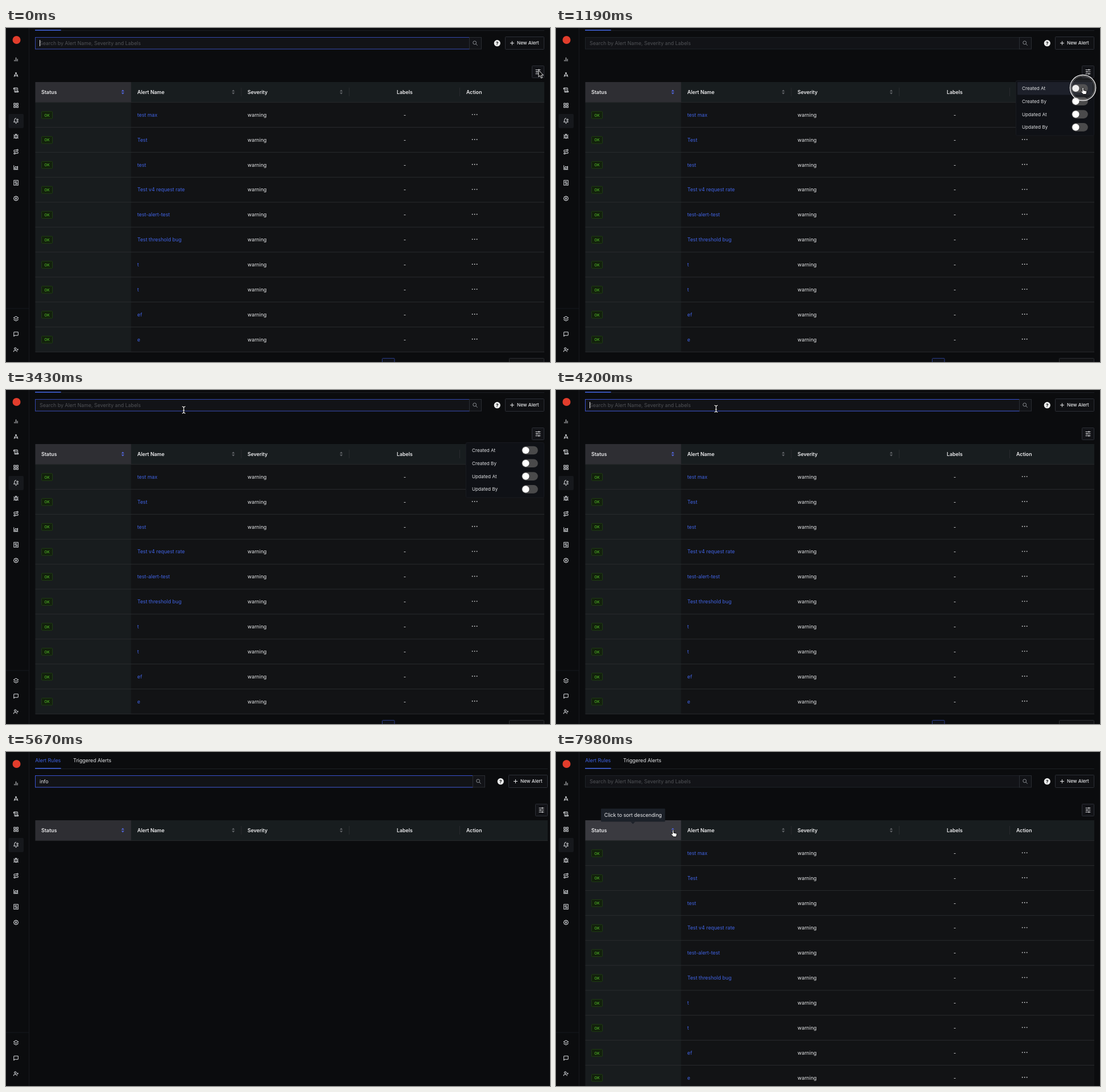
An HTML page for the animation above (8000 ms loop, 955 by 587 pixels).

```html
<!DOCTYPE html>
<html lang="en">
<head>
<meta charset="utf-8">
<title>Alert rules</title>
<style>
html, body { margin: 0; width: 100%; height: 100%; overflow: hidden; background: #0b0c0e; }
svg { display: block; font-family: Inter, "Open Sans", sans-serif; }
text { white-space: pre; }
</style>
</head>
<body>
<svg id="stage" width="955" height="587" viewBox="0 0 955 587" fill="none"></svg>
<script>
const LOOP = 8000, ROW = 43.86, TOP = 130.7;
const BLUE = '#4063e4', FOCUS = '#3a52d0', LINE = '#292b2e';

// Drawing helpers: every text is centred vertically on y.
const text = (x, y, s, fill = '#e6e7e9', size = 8.8, more = '') =>
  `<text x="${x}" y="${y + size * 0.364}" font-size="${size}" fill="${fill}" ${more}>${s}</text>`;
const rect = (x, y, w, h, fill, more = '') =>
  `<rect x="${x}" y="${y}" width="${w}" height="${h}" fill="${fill}" ${more}/>`;
const path = (d, stroke, more = '') => `<path d="${d}" stroke="${stroke}" ${more}/>`;
const circle = (x, y, r, fill, more = '') => `<circle cx="${x}" cy="${y}" r="${r}" fill="${fill}" ${more}/>`;
const bold = 'font-weight="600"', medium = 'font-weight="500"', middle = 'text-anchor="middle"';

const icons = [
  [55, 'M18 20V10M12 20V4M6 20v-6'],
  [82, 'M12 7a2 2 0 1 0 0-4 2 2 0 0 0 0 4M11 7 4 21M13 7l7 14M4 13c4 5 12 5 16 0'],
  [109, 'M8 21h12a2 2 0 0 0 2-2v-2H10v2a2 2 0 1 1-4 0V5a2 2 0 1 0-4 0v3h4M19 17V5a2 2 0 0 0-2-2H4M10 8h5M10 12h5'],
  [136, 'M3 3h7v7H3zM14 3h7v7h-7zM14 14h7v7h-7zM3 14h7v7H3z'],
  [163, 'M6 8a6 6 0 0 1 7-6M18 13c1 2 3 4 3 4H3s3-2 3-9M10 21a2 2 0 0 0 4 0M15 8a3 3 0 1 0 6 0a3 3 0 1 0-6 0'],
  [190.5, 'M8 2l2 2M16 2l-2 2M9 7V6a3 3 0 0 1 6 0v1M12 20a6 6 0 0 1-6-6v-3a4 4 0 0 1 4-4h4a4 4 0 0 1 4 4v3a6 6 0 0 1-6 6V11M6 13H2M22 13h-4M3 21c0-2 1-4 4-4M21 21c0-2-1-4-4-4M3 5c0 2 1 4 4 4M21 5c0 2-2 4-4 4'],
  [217.5, 'M9 19h8.5a3.5 3.5 0 0 0 0-7h-11a3.5 3.5 0 0 1 0-7H15M3 19a3 3 0 1 0 6 0a3 3 0 1 0-6 0M15 5a3 3 0 1 0 6 0a3 3 0 1 0-6 0'],
  [245, 'M3 3v18h18M7 17v-5l4-4 4 4 4-5v10z'],
  [272, 'M3 2h18v20H3zM8 7h8M8 12h8M8 17h8M8 7v5M16 12v5'],
  [299.5, 'M12 2l3 3 4 0 1 4 2 3-2 3-1 4-4 0-3 3-3-3-4 0-1-4-2-3 2-3 1-4 4 0zM9 12a3 3 0 1 0 6 0a3 3 0 1 0-6 0'],
  [511, 'M12 2 2 8l10 6 10-6zM2 15l10 6 10-6'],
  [538, 'M21 15a2 2 0 0 1-2 2H7l-4 4V5a2 2 0 0 1 2-2h14a2 2 0 0 1 2 2z'],
  [565.5, 'M2 21v-2a4 4 0 0 1 4-4h6a4 4 0 0 1 4 4v2M5 7a4 4 0 1 0 8 0a4 4 0 1 0-8 0M19 8v6M16 11h6']
];

function sidebar() {
  return rect(0, 0, 40, 587, '#0b0c0e') + path('M40.5 0V587M0 493H40', '#17191e') +
    circle(18.5, 21, 7, '#e23d2c') + rect(4.5, 151, 26.5, 25, '#16181c', 'rx="2"') +
    icons.map(([y, d]) => path(d, '#dcdee2',
      `stroke-width="2.4" stroke-linejoin="round" transform="translate(12.5 ${y - 5}) scale(.42)"`)).join('');
}

const sorter = (x, color) =>
  `<path fill="${color}" d="M${x - 2.6} 111.4h5.2l-2.6-3zM${x - 2.6} 113.4h5.2l-2.6 3z"/>`;

function tableRow(name, i) {
  const y = TOP + ROW * (i + 0.5);
  return rect(62.5, y - 5.9, 19, 12.4, '#12200c', 'stroke="#1f3c13" rx="1"') +
    text(72, y + 0.6, 'OK', '#4eae25', 6.6, middle + ' ' + medium) +
    text(230.5, y, name, BLUE) + text(424, y, 'warning') + text(700, y, '-', '#e6e7e9', 8.8, middle + ' ' + medium) +
    [818.7, 822.7, 826.7].map(x => circle(x, y - 0.6, 0.9, '#d5d6d8')).join('') +
    path(`M51.5 ${y + ROW / 2}H945`, LINE);
}

// The page gets "wide" extra pixels when it needs no scrollbar.
function page(names, wide) {
  const height = ROW * names.length;
  const right = s => `<g transform="translate(${wide})">${s}</g>`;
  return text(51.3, -10, 'Alert Rules', BLUE) + text(118, -10, 'Triggered Alerts') +
    path(`M51 4.5H${945 + wide}`, '#1d2025') + rect(51, 3, 45.5, 1.5, BLUE) +
    rect(51.5, 16.5, 762 + wide, 20.5, '#121317', 'stroke="#1f2228"') +
    `<rect class="field" x="51.5" y="16.5" width="${762 + wide}" height="20.5" stroke="${FOCUS}"/>` +
    right(rect(813.5, 16.5, 21, 20.5, '#121317', 'stroke="#2a2d33"') +
      circle(822.7, 25.8, 2.9, 'none', 'stroke="#8b8e93"') + path('M824.9 28l2.8 2.8', '#8b8e93') +
      circle(862.3, 26.7, 5.6, '#eceded') + text(862.3, 26.9, '?', '#0b0c0e', 8, middle + ' font-weight="700"') +
      rect(876.5, 15.5, 68, 22, '#0f1013', 'stroke="#2c2f36" rx="1"') +
      path('M885 26.5h7M888.5 23v7', '#e6e7e9') +
      text(897, 26.5, 'New Alert', '#e6e7e9', 8.2, medium) +
      rect(923.5, 66.5, 21, 21, '#121317', 'stroke="#2c2f36" rx="1"') +
      path('M929.5 73.5h9M929.5 77h9M929.5 80.5h9M935.5 72v3M932 75.5v3M935.5 79v3', '#d5d6d8')) +
    rect(51.5, 95, 893.5 + wide, TOP - 95, '#181d1f') +
    rect(51.5, 95, 168, TOP - 95, '#2e2e33', 'class="status"') +
    rect(51.5, TOP, 893.5 + wide, height, '#121315') + rect(51.5, TOP, 168, height, '#181c1e') +
    path(`M51.5 ${TOP}H${945 + wide}M413 105v15M602.5 105v15M796.5 105v15`, LINE) +
    sorter(205, '#5266dc') + sorter(399, '#63666a') + sorter(588.5, '#63666a') +
    [[62, 'Status'], [230.5, 'Alert Name'], [424, 'Severity'], [686, 'Labels'], [808, 'Action']]
      .map(([x, s]) => text(x, 112.3, s, '#ececee', 8.8, bold)).join('') +
    names.map(tableRow).join('');
}

function dropdown() {
  return rect(807.5, 92.5, 137, 96.5, '#0f1116', 'stroke="#181a20" rx="2"') +
    rect(810, 95, 132, 22.5, '#1d202a', 'id="hover" rx="1"') +
    ['Created At', 'Created By', 'Updated At', 'Updated By'].map((s, i) => {
      const y = 106 + 22.8 * i;
      return text(818, y, s, '#dfe0e3', 8.2) +
        rect(905.3, y - 7.3, 28.5, 14.6, '#4a4a4b', 'rx="7.3"') +
        (i ? '' : rect(905.3, y - 7.3, 28.5, 14.6, '#6478e0', 'rx="7.3" id="track"')) +
        circle(912.4, y, 6.1, '#fff', i ? '' : 'id="knob"');
    }).join('');
}

const rows = ['test max', 'Test', 'test', 'Test v4 request rate', 'test-alert-test',
  'Test threshold bug', 't', 't', 'ef', 'e'];
const beam = 'M-3-6q3 0 3 2.5q0-2.5 3-2.5M0-3.5v7M-3 6q3 0 3-2.5q0 2.5 3 2.5M-1.5 1h3';

document.getElementById('stage').innerHTML =
  `<g id="body"><g id="full">${page(rows, 0)}</g><g id="filtered">${page([], 6)}</g>
    ${text(59, 26.6, 'Search by Alert Name, Severity and Labels', '#505256', 8.8, 'id="hint"')}
    ${text(59, 26.6, '', '#e6e7e9', 8.8, 'id="query"')}
    ${rect(59, 21, 1, 11, '#f0f0f0', 'id="caret"')}
    <g id="pages">${rect(660.5, 580.5, 21.5, 22, '#0f1118', 'stroke="#2a3c88" rx="1"')}</g>
    ${rect(883.5, 580.5, 61, 22, '#121315', 'stroke="#2b2d31" rx="1"')}
    <g id="menu">${dropdown()}</g>
    <g id="tip">${rect(79, 74.5, 112.5, 23, '#1c2129', 'rx="1"')}
      <path d="M131 97.5h8l-4 4z" fill="#1c2129"/>
      ${text(135.3, 86, 'Click to sort descending', '#f0f0f2', 8.8, middle)}</g>
  </g>
  ${sidebar()}
  <g id="ring"><circle r="22.5" stroke="#e6e6e6" stroke-width="1.5"/><circle r="20.5" stroke="#777" fill="#8882"/></g>
  <g id="pointer" stroke="#000" stroke-width=".9" stroke-linejoin="round">
    <path id="arrow" fill="#000" stroke="#fff" d="M0 0v11.5l2.7-2.5 1.9 4.6 2-.9-1.9-4.4h3.7z"/>
    <path id="hand" fill="#fff" d="M-1.2 1a1.2 1.2 0 0 1 2.4 0v4l4 .9c1.2.3 1.6 1 1.4 2.2L5.8 12H.6L-3.2 7.8c-.6-1 .7-1.8 2-.6z"/>
    <g id="beam"><path d="${beam}" stroke-width="2.6"/><path d="${beam}" stroke="#fff" stroke-width="1.2"/></g>
  </g>`;

const el = {};
document.querySelectorAll('[id]').forEach(e => el[e.id] = e);
const fields = document.querySelectorAll('.field'), statusCells = document.querySelectorAll('.status');

const ramp = (t, a, b) => Math.min(1, Math.max(0, (t - a) / (b - a)));
const show = (e, on) => e.setAttribute('opacity', +on);
const move = (e, x, y, s = 1) => e.setAttribute('transform', `translate(${x} ${y}) scale(${s})`);

const edits = [[0, ''], [3990, ''], [4550, 'i'], [4830, 'in'], [4970, 'inf'], [5180, 'info'],
  [6230, 'inf'], [6370, 'in'], [6510, 'i'], [6720, '']];
const stops = [[0, 935, 74.5], [300, 935, 74.5], [840, 925, 104.5], [2550, 925, 104.5], [3010, 770, 34],
  [3120, 770, 34], [3430, 312, 35], [3920, 281, 33], [7110, 281, 33], [7520, 205.5, 137], [LOOP, 205.5, 137]];
const clicks = [100, 1080, 2100, 7560];

function pointerAt(t) {
  const i = Math.max(1, stops.findIndex(s => s[0] > t));
  const [a, x, y] = stops[i - 1], [b, x2, y2] = stops[i];
  let k = ramp(t, a, b);
  k *= k * (3 - 2 * k);
  return [x + (x2 - x) * k, y + (y2 - y) * k];
}

function draw(now) {
  const t = now % LOOP;
  const shift = t < 5180 ? 0 : 25, filtered = t >= 5180 && t < 6510;
  const [x, y] = pointerAt(t), py = y - shift;
  const focused = t < 140 || (t >= 3990 && t < 7700);

  move(el.body, 0, shift);
  show(el.full, !filtered);
  show(el.filtered, filtered);
  move(el.pages, t >= 5040 && t < 5180 ? 27.5 : 0, 0);

  // Search field
  const [since, value] = edits.filter(e => e[0] <= t).pop();
  el.query.textContent = value;
  show(el.hint, !value);
  const width = value ? el.query.getComputedTextLength() : 0;
  el.caret.setAttribute('x', 59 + width);
  show(el.caret, focused && Math.floor((t - since) / 490) % 2 === 0);
  const inField = x > 51 && x < 813 && py > 15 && py < 38;
  const glow = t < 3000 ? 0.8 * (1 - ramp(t, 140, 340))
    : t > 7000 ? 1 - ramp(t, 7700, 7880) : 0;
  fields.forEach(f => show(f, t < 140 ? 0.8 : focused ? 1 : inField ? 0.8 : glow));

  // Column menu and its first switch
  const open = ramp(t, 140, 280) * (1 - ramp(t, 3990, 4150));
  show(el.menu, open);
  const inMenu = open > 0 && x > 810 && x < 942 && y > 95 && y < 118;
  show(el.hover, inMenu);
  const on = ramp(t, 1260, 1410) * (1 - ramp(t, 2280, 2430));
  show(el.track, on);
  el.knob.setAttribute('cx', 912.4 + 14.3 * on);

  // Sort header
  const inHeader = t > 7000 && x < 219 && py > 95 && py < TOP;
  statusCells.forEach(c => c.setAttribute('fill', inHeader ? '#3a3a40' : '#2e2e33'));
  show(el.tip, ramp(t, 7630, 7780));

  // Pointer and click ring
  show(el.pointer, t < 4550 || t >= 7140);
  move(el.pointer, x, y);
  const hand = inMenu || inHeader;
  show(el.hand, hand);
  show(el.beam, inField);
  show(el.arrow, !hand && !inField);
  const click = clicks.find(c => t >= c && t < c + 200);
  show(el.ring, click !== undefined && 1 - ramp(t, click + 140, click + 200));
  move(el.ring, x, y + 0.5, click === undefined ? 1 : 0.5 + 0.5 * ramp(t, click, click + 70));
}

const start = performance.now();
(function frame() {
  draw(performance.now() - start);
  requestAnimationFrame(frame);
})();
</script>
</body>
</html>
```
